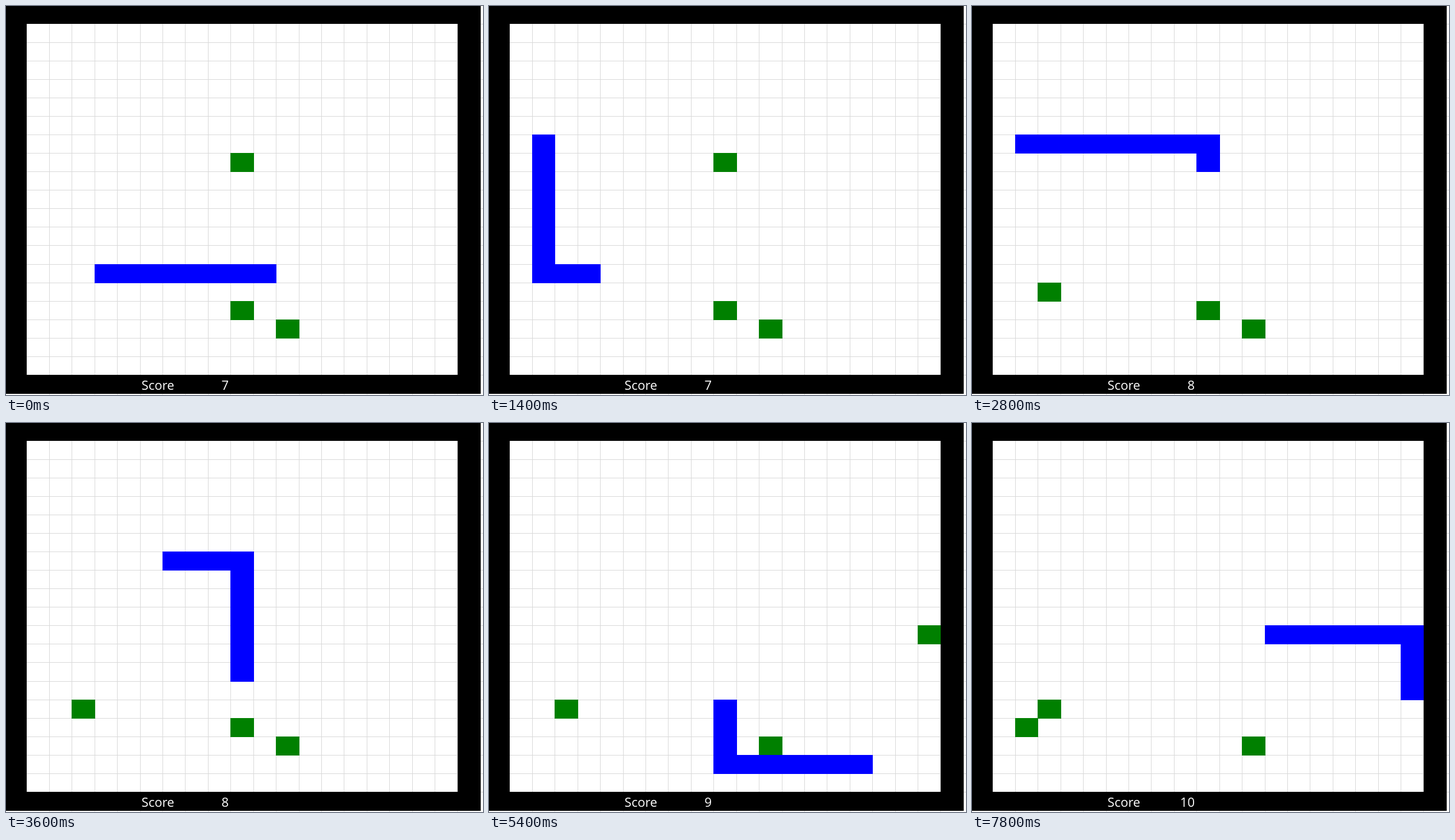
An HTML page for the animation above (8000 ms loop, 829x675 px).

```html
<!DOCTYPE html>
<html lang="en">
<head>
<meta charset="utf-8">
<title>Snake</title>
<style>
  html, body { margin: 0; width: 100%; height: 100%; overflow: hidden; background: #fff; }
  svg { display: block; }
  text { font: 22px "Open Sans", "Noto Sans", sans-serif; fill: #fff; }
</style>
</head>
<body>
<svg width="829" height="675" viewBox="0 0 829 675" shape-rendering="crispEdges">
  <rect width="829" height="675" fill="#fff"/>
  <path id="grid" fill="#d9d9d9"/>
  <path fill="#000" fill-rule="evenodd" d="M0 0H825V673H0ZM36 31V640H785V31Z"/>
  <path id="food" fill="#008000"/>
  <path id="snake" fill="#00f"/>
  <text x="235.6" y="666">Score</text>
  <text id="score" x="387" y="666" text-anchor="end">7</text>
</svg>
<script>
const LOOP = 8000, TICK = 200;
const CELLS_PER_TICK = 1.2815, PHASE = 0.28;
const LENGTH = 10, TAIL_START = -7, START_SCORE = 7;

const corners = [[10, 13], [1, 13], [1, 6], [9, 6], [9, 17], [18, 17], [18, 10], [11, 10]];

// Each food appears and is eaten when the head reaches the given path step.
const foods = [
  { at: [9, 7], eaten: 18 },
  { at: [9, 15], eaten: 26 },
  { at: [11, 16] },
  { at: [2, 14], from: 18 },
  { at: [18, 10], from: 26, eaten: 44 },
  { at: [1, 15], from: 44 }
];

const byId = id => document.getElementById(id);
const colX = c => Math.floor(36 + 39.42 * c);
const rowY = r => Math.floor(31 + 32.08 * r);
const box = (x1, y1, x2, y2) => `M${x1} ${y1}H${x2}V${y2}H${x1}Z`;
const cell = ([c, r]) => box(colX(c), rowY(r), colX(c + 1) + 1, rowY(r + 1) + 1);

const route = [corners[0]];
for (const [c, r] of corners.slice(1)) {
  let [x, y] = route[route.length - 1];
  while (x !== c || y !== r) {
    x += Math.sign(c - x);
    y += Math.sign(r - y);
    route.push([x, y]);
  }
}

let lines = box(825, 31, 829, 32);
for (let i = 1; i <= 19; i++) {
  lines += box(colX(i), 31, colX(i) + 1, 675);
  lines += box(36, rowY(i), 829, rowY(i) + 1);
}
byId("grid").setAttribute("d", lines);

function draw(time) {
  const tick = Math.floor((time % LOOP) / TICK);
  const head = Math.floor(PHASE + tick * CELLS_PER_TICK);
  const tail = Math.max(TAIL_START, head - LENGTH + 1);
  const body = route.slice(tail - TAIL_START, head - TAIL_START + 1);
  const visible = foods.filter(({ from = 0, eaten = Infinity }) => head >= from && head < eaten);

  byId("snake").setAttribute("d", body.map(cell).join(""));
  byId("food").setAttribute("d", visible.map(f => cell(f.at)).join(""));
  byId("score").textContent = START_SCORE + foods.filter(f => head >= f.eaten).length;
}

const start = performance.now();
function frame() {
  draw(performance.now() - start);
  requestAnimationFrame(frame);
}
frame();
</script>
</body>
</html>
```
